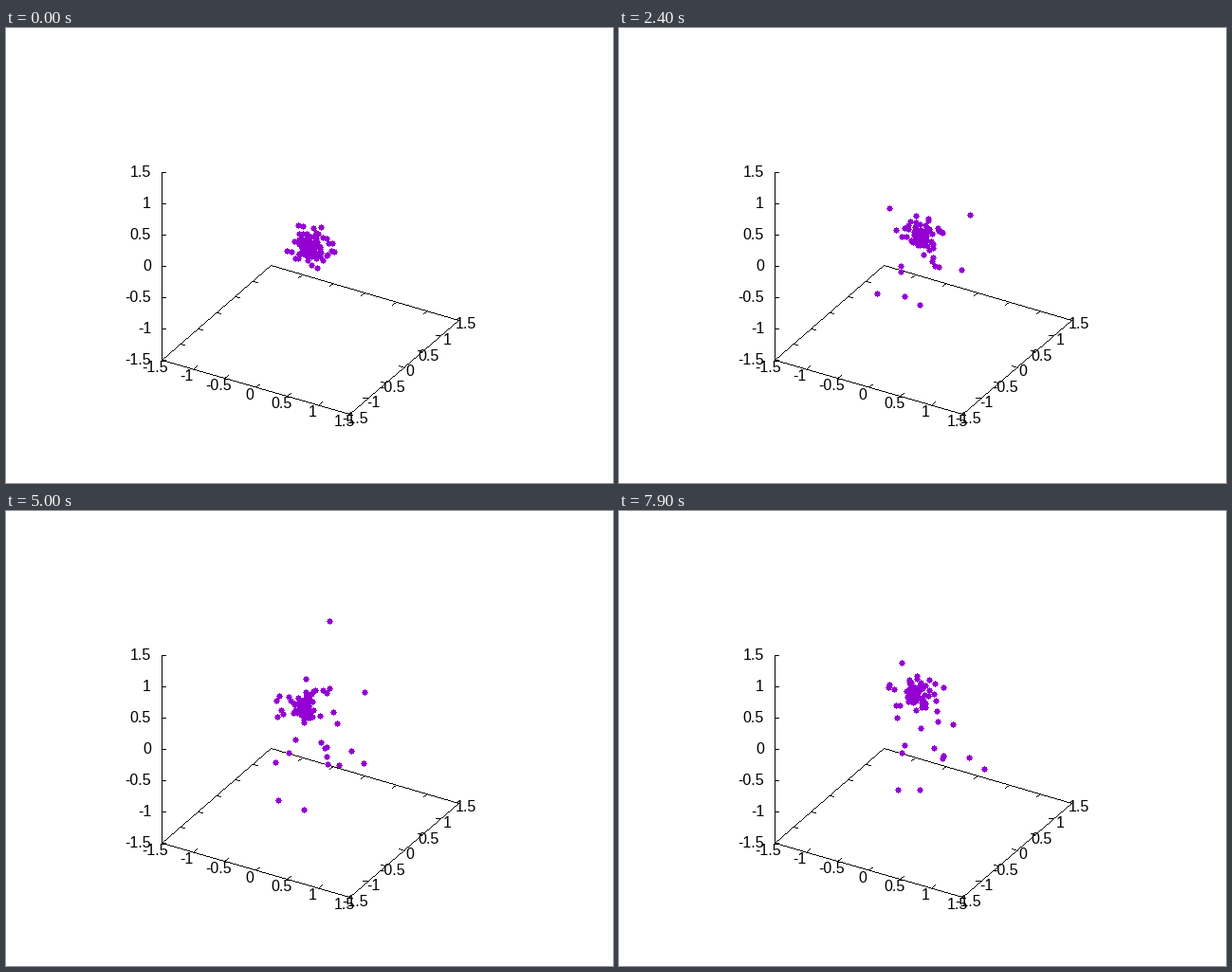
Animation, 640 px wide and 480 px high, one loop 8000 ms. Source, as a matplotlib script:

```python
import numpy as np
import matplotlib.pyplot as plt
from matplotlib.animation import FuncAnimation
from matplotlib.collections import PolyCollection

W, H, DPI = 640, 480, 100
FRAMES, INTERVAL = 80, 100
PURPLE = "#9400d3"
rng = np.random.default_rng(12)

plt.rcParams["font.family"] = "Liberation Sans"
fig = plt.figure(figsize=(W / DPI, H / DPI), dpi=DPI, facecolor="white")
ax = fig.add_axes([0, 0, 1, 1])
ax.set_xlim(0, W)
ax.set_ylim(H, 0)
ax.axis("off")


def stamps(color, z):
    """Collection of hard-edged pixel shapes."""
    shapes = PolyCollection([], facecolors=color, edgecolors="none",
                            linewidths=0, antialiaseds=False, zorder=z)
    ax.add_collection(shapes, autolim=False)
    return shapes


# ---- box and labels ----
PIXEL = np.array([(0, 0), (1, 0), (1, 1), (0, 1)])
ink = []


def line(a, b):
    """Stepped one-pixel line."""
    a, b = np.round(a), np.round(b)
    steps = int(abs(b - a).max()) + 1
    ink.extend(np.round(np.linspace(a, b, steps))[:, None, :] + PIXEL)


def label(x, y, text, ha="center"):
    ax.text(x, y + 5, text, ha=ha, va="baseline", fontsize=16 * 72 / DPI,
            color="black", zorder=2)


LEFT, BACK, RIGHT, FRONT = map(np.array, [(164, 350), (279, 250), (477, 308), (362, 407)])
TOP = np.array([164, 152])
X_TICK, Y_TICK, Z_TICK = np.array([4, -3]), np.array([-5, -1]), np.array([4, 0])

for a, b in [(LEFT, BACK), (BACK, RIGHT), (RIGHT, FRONT), (FRONT, LEFT), (LEFT, TOP)]:
    line(a, b)

for i, f in enumerate(np.linspace(0, 1, 7)):
    name = f"{-1.5 + 3 * f:g}"
    mark = LEFT + f * (TOP - LEFT)
    line(mark, mark + Z_TICK)
    label(153, mark[1], name, "right")
    if 0 < i < 6:
        for start, end, tick in [(LEFT, FRONT, X_TICK), (BACK, RIGHT, -X_TICK),
                                 (FRONT, RIGHT, Y_TICK), (LEFT, BACK, -Y_TICK)]:
            p = start + f * (end - start)
            line(p, p + tick)
    label(157.3 + 33.2 * i, 358 + 9.5 * i, name)
    label(368 + 19.4 * i, 412 - 16.6 * i, name)

stamps("black", 1).set_verts(ink)


# ---- particles ----
def center(t):
    t = np.asarray(t)
    return np.stack([321 - 0.125 * t, 231 - 0.5 * t], axis=-1)


def swarm(n):
    """Random elliptic orbits: two axis vectors, a rate and a phase each."""
    rate = rng.uniform(0.08, 0.28, n) * rng.choice([-1, 1], n)
    return rng.normal(0, 1, (2, n, 2)), rate, rng.uniform(0, 2 * np.pi, n)


def orbit(group, t, scale):
    (a, b), rate, phase = group
    ang = (rate * t + phase)[:, None]
    return center(t) + scale * (a * np.cos(ang) + b * np.sin(ang)).clip(-2.3, 2.3)


core, halo = swarm(52), swarm(20)

# Particles flung from the core: start, time to the far point, offset there.
FLUNG = np.array([
    (12, 100, -126, -190),
    (28, 100, 68, -251),
    (2, 100, -100, 126),
    (0, 52, -13, 78),
    (0, 56, -46, 68),
    (0, 42, 57, -42),
    (0, 56, 50, 35),
    (28, 50, 66, 58),
])
N = 18
angle = rng.uniform(0, 2 * np.pi, N)
reach = rng.uniform(28, 56, N)
flung = np.vstack([FLUNG, np.column_stack([
    rng.uniform(0, 40, N), rng.uniform(28, 50, N),
    reach * np.cos(angle), reach * np.sin(angle)])])
start, rise, far = flung[:, 0], flung[:, 1], flung[:, 2:]
jitter = rng.normal(0, 4, far.shape)


def thrown(t):
    """Decelerating flight out and back; gone once outside the box."""
    u = np.maximum(t - start, 0) / rise
    p = center(np.minimum(t, start)) + jitter + far * (u * (2 - u))[:, None]
    return p[(p[:, 0] > 258) & (p[:, 1] > 98)]


# Small disc: a 5 px block with a 1 px nub on each side.
quarter = np.array([(3.5, -0.5), (3.5, 0.5), (2.5, 0.5), (2.5, 2.5), (0.5, 2.5)])
turn = np.array([(0, 1), (-1, 0)])
DISC = np.concatenate([quarter @ np.linalg.matrix_power(turn, k) for k in range(4)]) + 0.5

dots = stamps(PURPLE, 3)


def draw(t):
    pts = np.vstack([orbit(core, t, 5 + 5 * np.exp(-t / 12)),
                     orbit(halo, t, 12 + 0.02 * t),
                     thrown(t)])
    dots.set_verts(np.round(pts)[:, None, :] + DISC)
    return (dots,)


anim = FuncAnimation(fig, draw, frames=FRAMES, interval=INTERVAL,
                     repeat=True, repeat_delay=0, blit=False)
plt.show()
```
